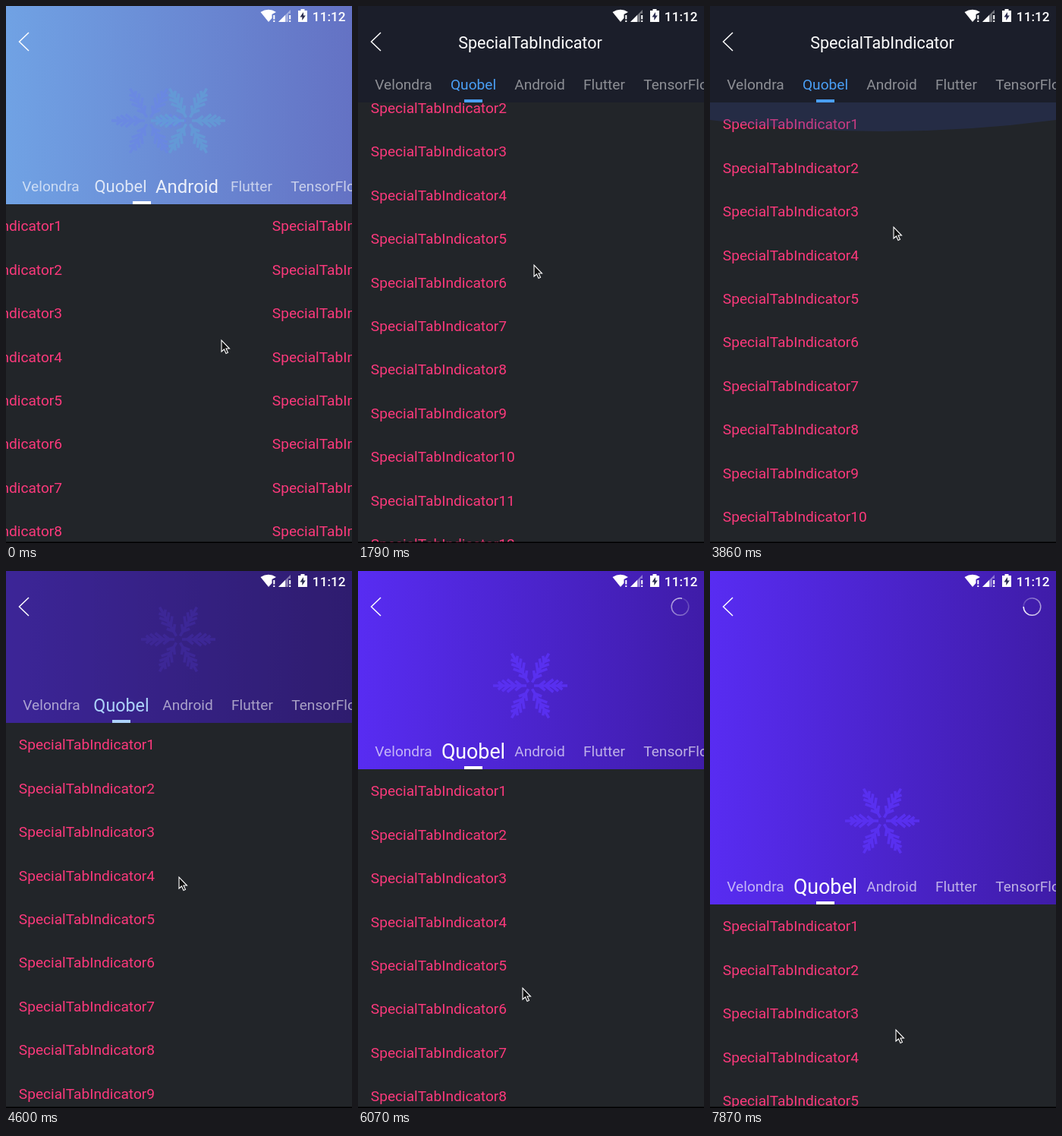
Animation of 456x707 px, one loop 8000 ms. Source, as an HTML page with a canvas:

```html
<!DOCTYPE html>
<html lang="en">
<head>
<meta charset="utf-8">
<title>SpecialTabIndicator</title>
<style>
  html, body { margin: 0; width: 100%; height: 100%; overflow: hidden; background: #222529; }
  canvas { display: block; }
</style>
</head>
<body>
<canvas id="stage" width="456" height="707"></canvas>
<script>
const ctx = document.getElementById('stage').getContext('2d');
const W = 456, STAGE_H = 707, LOOP = 8000, STEP = 148.45;
const EXPANDED = 261, COLLAPSED = 127, RANGE = EXPANDED - COLLAPSED;
const ROW = 57.42, FONT = 19.14, RESISTANCE = 0.664;
const TABS = [['Velondra', 60], ['Quobel', 152], ['Android', 239.5], ['Flutter', 324.5], ['TensorFlow', 425.7]];

// Turning points of the pointer: time, x, y
const POINTER = [[0, 284, 440], [600, 228, 508], [890, 228, 471], [1790, 232, 340], [2600, 208, 200],
  [3860, 242, 291], [4300, 236, 330], [5640, 202, 655], [6980, 247, 336], [7870, 245, 605], [LOOP, 245, 605]];

const clamp = v => Math.max(0, Math.min(1, v));
const mix = (a, b, k) => a + (b - a) * k;
const ramp = (t, from, to) => clamp((t - from) / (to - from));
const smooth = k => k * k * (3 - 2 * k);
const easeOut = k => 1 - (1 - k) ** 2;
const white = alpha => `rgba(255,255,255,${alpha})`;

function motion(t) {
  const swipe = 303 * ramp(t, 701, 2240);
  const fling = 40 * easeOut(ramp(t, 2240, 2800));
  const flingBack = (343 - RANGE) * ramp(t, 3000, 3650);
  const pull = 326 * ramp(t, 4300, 5640);
  const stretch = RESISTANCE * (Math.max(0, pull - RANGE) * (1 - smooth(ramp(t, 5650, 6000)))
    + 269 * ramp(t, 6985, 7870));
  const travel = swipe + fling - flingBack - Math.min(RANGE, pull);
  const bottom = Math.round(EXPANDED - Math.min(RANGE, travel) + stretch);
  const refreshing = t > 5640 ? 0.7 * (1 - ramp(t, 6100, 6500)) : 0;
  return {
    bottom,
    open: clamp((bottom - COLLAPSED) / RANGE),
    scroll: Math.max(0, travel - RANGE),
    settle: 1 - easeOut(ramp(t, 0, 450)),
    glow: Math.sin(Math.PI * ramp(t, 3600, 4120)),
    spin: Math.max(refreshing, clamp(stretch / 178)),
  };
}

function pointerAt(t) {
  const next = POINTER.findIndex(p => p[0] > t);
  const [t0, x0, y0] = POINTER[next - 1], [t1, x1, y1] = POINTER[next];
  const k = ramp(t, t0, t1);
  return [Math.round(mix(x0, x1, k)), Math.round(mix(y0, y1, k))];
}

function rect(x, y, w, h, fill) {
  ctx.fillStyle = fill;
  ctx.fillRect(x, y, w, h);
}

function path(points, close) {
  ctx.beginPath();
  points.forEach(([x, y]) => ctx.lineTo(x, y));
  if (close) ctx.closePath();
}

function poly(points, color) {
  path(points, true);
  ctx.fillStyle = color;
  ctx.fill();
}

function stroke(color, width) {
  ctx.strokeStyle = color;
  ctx.lineWidth = width;
  ctx.stroke();
}

function label(text, x, baseline, size, color, align = 'left', weight = 400) {
  ctx.font = `${weight} ${size}px Roboto, sans-serif`;
  ctx.textAlign = align;
  ctx.fillStyle = color;
  ctx.fillText(text, x, baseline);
}

function fade(left, right) {
  const g = ctx.createLinearGradient(0, 0, W, 0);
  g.addColorStop(0, left);
  g.addColorStop(1, right);
  return g;
}

function snowflake(x, y, color, alpha) {
  ctx.save();
  ctx.translate(x, y);
  ctx.globalAlpha = alpha;
  ctx.beginPath();
  for (let arm = 0; arm < 6; arm++) {
    ctx.rotate(Math.PI / 3);
    ctx.moveTo(5, 0);
    ctx.lineTo(49, 0);
    for (let root = 12; root < 40; root += 8)
      for (const side of [-1, 1]) {
        const spread = 11 - Math.abs(root - 22) / 3;
        ctx.moveTo(root, 0);
        ctx.lineTo(root + spread, side * spread * 0.8);
      }
  }
  stroke(color, 3.6);
  ctx.restore();
}

function list(x, top, scroll) {
  for (let i = 0; i < 20; i++) {
    const baseline = Math.round(top + ROW * (i + 0.5) + FONT * 0.342 - scroll);
    label('SpecialTabIndicator' + (i + 1), x + 16.8, baseline, FONT, '#fb397b');
  }
}

function header({ bottom, open, settle }) {
  rect(0, 0, W, bottom, fade('#582cf2', '#3f1ca8'));
  ctx.globalAlpha = settle;
  rect(0, 0, W, bottom, fade('#70a2e4', '#6472c4'));
  ctx.globalAlpha = 1;
  snowflake(227 - 39 * settle, bottom - 110, settle > 0.3 ? '#6a86e6' : '#5a31f3', 0.9 - 0.2 * settle);
  snowflake(227 + 13 * settle, bottom - 110, '#62a0d8', 0.7 * settle);
  rect(0, 0, W, bottom, `rgba(27,30,42,${1 - open})`);
  label('SpecialTabIndicator', 227, 55.5, 21.5, white(clamp(1 - open * 3)), 'center');

  const active = `rgb(${mix(74, 255, open)},${mix(159, 255, open)},${mix(245, 255, open)})`;
  TABS.forEach(([name, x], i) => {
    const chosen = [0, 1 - 0.63 * settle, 0.63 * settle][i] || 0;
    const size = FONT * (1 + 0.4 * chosen * open);
    const color = chosen > 0.9 ? active : white(0.5 + 0.15 * open + 0.35 * chosen);
    label(name, x - settle, bottom - 23.5 + size * 0.355, size, color, 'center');
  });
  rect(140 + 27 * settle, bottom - 4, 24, 4, active);
}

function statusBar() {
  ctx.beginPath();
  ctx.moveTo(346, 21);
  ctx.lineTo(335.5, 8);
  ctx.quadraticCurveTo(346, 1.5, 356, 8);
  ctx.lineTo(350.5, 11);
  ctx.lineTo(350.5, 16);
  ctx.fillStyle = '#fff';
  ctx.fill();
  poly([[359, 21], [375, 5], [375, 10], [372, 10], [372, 21]], white(0.4));
  poly([[359, 21], [368, 12], [368, 21]], '#fff');
  for (const x of [352.3, 373.2]) {
    rect(x, 12, 2, 5.5, '#fff');
    rect(x, 19, 2, 2, '#fff');
  }
  rect(385, 6, 12, 15, '#fff');
  rect(388.5, 4, 5, 2, '#fff');
  poly([[392, 8], [387.5, 14.5], [390.3, 14.5], [390.3, 19], [394.8, 12.5], [392, 12.5]], '#2b2d50');
  label('11:12', 447.5, 20, 17.2, '#fff', 'right', 500);
  path([[30, 35], [17.5, 47], [30, 59]]);
  stroke('#fff', 1.5);
}

function spinner(t, alpha) {
  const sweep = ctx.createConicGradient(2.3 + t / 400, 424.5, 47);
  sweep.addColorStop(0, white(0.15 * alpha));
  sweep.addColorStop(1, white(alpha));
  ctx.beginPath();
  ctx.arc(424.5, 47, 11.3, 0, 2 * Math.PI);
  stroke(sweep, 1.5);
}

function edgeGlow(amount) {
  const edge = COLLAPSED + 23 * amount;
  ctx.beginPath();
  ctx.moveTo(0, COLLAPSED);
  ctx.lineTo(0, edge);
  ctx.quadraticCurveTo(W / 2, edge + 30 * amount, W, edge);
  ctx.lineTo(W, COLLAPSED);
  ctx.fillStyle = `rgba(46,65,150,${0.26 * amount})`;
  ctx.fill();
}

function pointer([x, y]) {
  const outline = [[0, 0], [0, 15], [3.5, 12], [6, 17.5], [8.5, 16.3], [6, 11], [10.5, 11]];
  poly(outline.map(([dx, dy]) => [x + dx, y + dy]), '#111');
  stroke('#fff', 1.1);
}

function draw(now) {
  const t = Math.min(53, Math.floor((now % LOOP + 15) / 148.3)) * STEP;
  const state = motion(t);
  const page = -122 * state.settle;

  rect(0, 0, W, STAGE_H, '#222529');
  list(page, state.bottom, state.scroll);
  if (page) list(page + W, state.bottom, 0);
  edgeGlow(state.glow);
  header(state);
  statusBar();
  spinner(t, state.spin);
  rect(0, 705.5, W, 1.5, '#000');
  pointer(pointerAt(t));
}

const start = performance.now();
function tick() {
  draw(performance.now() - start);
  requestAnimationFrame(tick);
}
tick();
</script>
</body>
</html>
```
